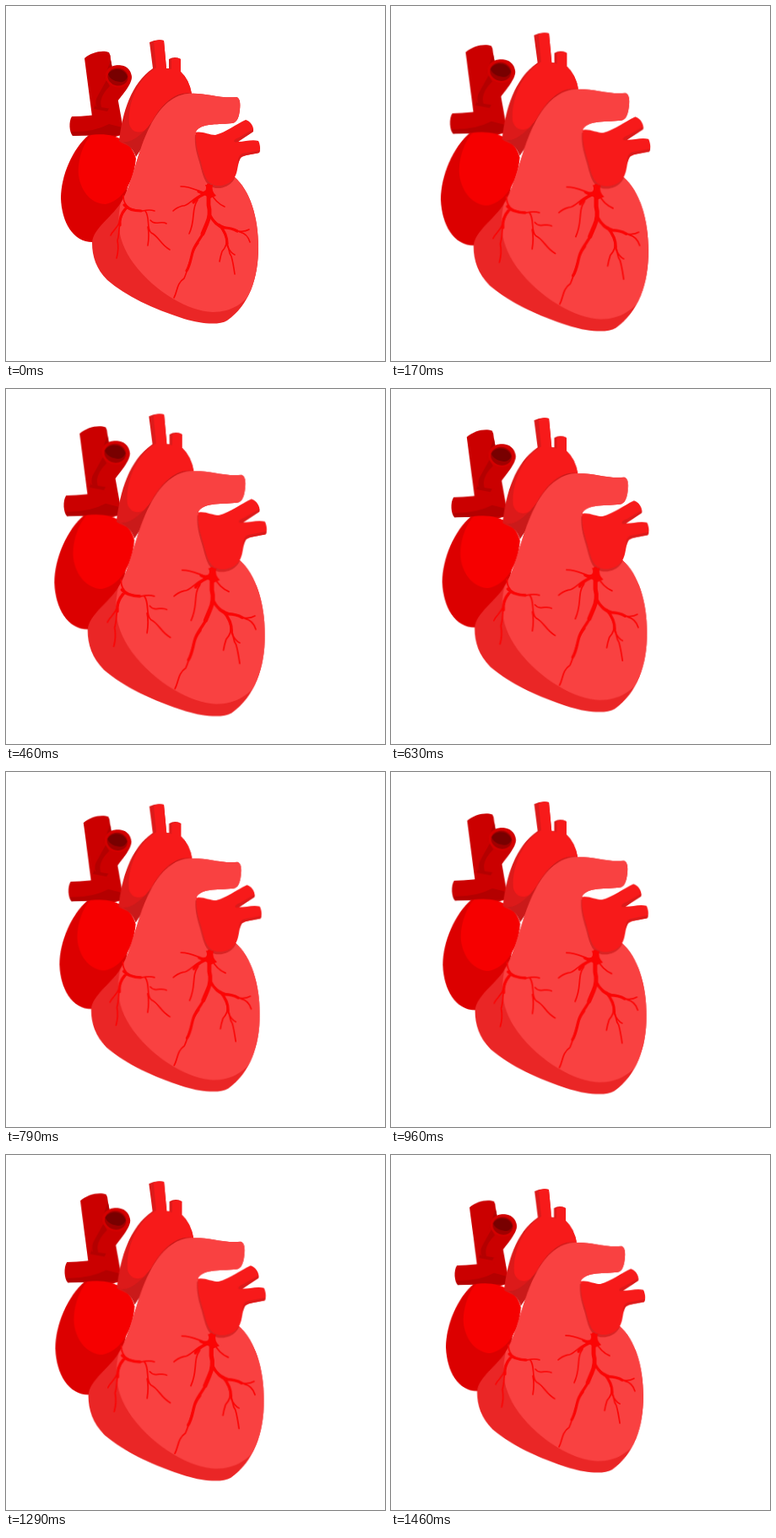
An HTML page without scripts that plays this animation: 449 px wide and 421 px high, repeating every 1500 ms.

```html
<!DOCTYPE html>
<html lang="en">
<head>
<meta charset="utf-8">
<title>Beating heart</title>
<style>
  html, body { margin: 0; width: 100%; height: 100%; overflow: hidden; background: #fff; }
  svg { display: block; width: 100vw; height: 100vh; }

  /* 36 poses per loop: two beats, each segment stepped one pose at a time */
  .heart { transform-origin: 182px 203px; animation: beat 1.5s -10ms infinite; }
  @keyframes beat {
    0%      { transform: scale(1);     animation-timing-function: steps(4); }
    11.111% { transform: scale(1.052); animation-timing-function: steps(3); }
    19.444% { transform: scale(1.096); animation-timing-function: steps(1); }
    22.222% { transform: scale(1.087); animation-timing-function: steps(7); }
    41.667% { transform: scale(1.037); animation-timing-function: steps(6); }
    58.333% { transform: scale(1.002); animation-timing-function: steps(2); }
    63.889% { transform: scale(1.031); animation-timing-function: steps(5); }
    77.778% { transform: scale(1.098); animation-timing-function: steps(7); }
    97.222%, 100% { transform: scale(1); }
  }

  .cava { fill: #cb0000; }
  .cava-shade { fill: #b40000; }
  .artery { fill: #f71a1a; }
  .artery-shade { fill: #dc1a1a; }
  .veins { fill: none; stroke: #fb0505; stroke-linecap: round; stroke-linejoin: round; }
</style>
</head>
<body>
<svg viewBox="0 0 449 421" preserveAspectRatio="none">
  <defs>
    <path id="body" d="M273 108C277 109 278 115 277 123C276 132 274 138 268 139C254 141 231 138 225 149L240 200L271 203C289 219 299 250 299 286C299 323 288 355 262 373C252 379 231 377 211 371C174 359 142 344 120 325C107 312 102 297 102 281C103 263 127 250 138 230C151 207 156 170 171 142C181 122 196 106 215 104C235 102 252 110 273 108Z"/>
    <path id="valve" d="M225 150C232 148 240 153 248 153C260 150 273 140 284 135C289 136 294 143 293 148C288 153 280 156 275 161C283 161 291 158 299 160C301 164 302 170 300 174C293 176 283 176 278 180C274 187 275 196 271 203C265 213 250 216 242 210C235 205 233 192 230 182C227 172 224 162 225 150Z"/>
    <clipPath id="in-body"><use href="#body"/></clipPath>
  </defs>

  <g class="heart">
    <g id="vena-cava">
      <path class="cava" d="M93 62C101 55 114 52 122 55Q124 58 124 63L140 152L106 162Z"/>
      <path class="cava-shade" d="M124 64L132 104L120 125L104 122Z"/>
      <path class="cava" d="M118 82C122 67 147 65 149 84C149 93 139 104 125 122L106 119Q104 111 108 104Z"/>
      <path class="cava-shade" d="M119 88L109 106Q105 112 107 119L114 122Q108 110 123 95Z"/>
      <ellipse cx="133" cy="83.500" rx="15.500" ry="13" fill="#d40000" transform="rotate(12 133 83.500)"/>
      <ellipse cx="132.500" cy="84" rx="12" ry="10.500" fill="#a00000" transform="rotate(12 132.500 84)"/>
      <path d="M121 81C125 73 140 72 144 84Q141 91 135 90C127 89 123 86 121 81Z" fill="#780000"/>
      <path class="cava" d="M78 131C92 131 108 129 122 127L125 151Q100 152 79 154C75 150 74 137 78 131Z"/>
      <path class="cava-shade" d="M77 149Q103 150 122 140L138 144L140 153L79 154Z"/>
    </g>

    <g id="left-atrium">
      <path fill="#dc0000" d="M98 153C79 169 65 201 65 228C66 257 80 281 104 280L140 233L152 180C150 165 127 149 98 153Z"/>
      <path fill="#f60000" d="M101 153C93 160 84 182 86 201C89 221 102 235 118 235C137 231 151 211 154 181C149 160 128 149 101 153Z"/>
    </g>

    <g id="aorta">
      <path class="artery-shade" d="M170 43Q178 39 187 41L190 74L193 74V63Q200 59 207 63V78Q217 87 220 104L187 125L155 176C148 164 137 164 134 160C138 126 148 92 174 74Z"/>
      <path class="artery" d="M175 42Q181 39 187 41L190 74L196 75V63Q203 60 207 63V78Q217 87 220 104C202 104 186 116 175 137C166 152 150 154 146 140C144 120 153 88 178 73Z"/>
      <path fill="#ca1a1a" d="M134 160C147 166 163 151 173 137C187 111 206 100 220 104L187 128L154 179Q148 163 134 160Z"/>
    </g>

    <use href="#body" fill="#ea2626"/>
    <g clip-path="url(#in-body)">
      <path fill="#f94141" d="M136 233C129 264 137 285 151 305C177 340 217 362 245 363C268 363 283 352 294 335L320 260L280 200V90H160Z"/>
      <use href="#valve" fill="#d92525" transform="translate(-1 3)"/>
    </g>

    <g id="pulmonary-vein">
      <use href="#valve" class="artery"/>
      <path class="artery-shade" d="M293 146V149L275 161C268 163 269 158 276 156Z"/>
      <path class="artery-shade" d="M301 171L300 174L280 178Q277 180 275 187Q274 178 280 175Z"/>
    </g>

    <g class="veins">
      <g stroke-width="1.600">
        <path d="M240 219C231 225 225 214 207 214"/>
        <path d="M234 223C221 227 216 238 209 237Q202 239 198 243"/>
        <path d="M227 230C219 241 225 253 217 270"/>
        <path d="M243 222Q248 233 259 238"/>
        <path d="M242 248C251 265 268 262 277 268Q286 270 289 280M276 267Q283 268 288 265"/>
        <path d="M253 260C260 271 266 280 256 291Q254 297 253 303M262 282C265 288 263 292 267 297Q269 304 271 318"/>
        <path d="M262 284Q266 293 271 295"/>
        <path d="M228 281C218 293 217 310 211 323C202 329 203 339 199 346"/>
        <path d="M139 225C139 242 154 242 162 243Q170 241 176 243"/>
        <path d="M144 239C131 252 136 266 132 278Q134 288 131 299M136 253C131 266 127 265 124 272"/>
        <path d="M165 243C171 251 166 264 172 269C181 273 183 283 194 289M168 262Q170 271 168 284M171 254C177 261 184 254 190 258"/>
      </g>
      <g stroke-width="3.200">
        <path d="M239 219Q234 224 228 220M235 223Q226 227 222 233M241 247Q248 261 258 263Q267 263 274 267"/>
        <path d="M253 260Q262 270 262 282M237 260C235 272 227 277 222 289C219 297 219 306 214 314"/>
        <path d="M140 236Q146 243 160 243M141 241Q134 249 135 260"/>
      </g>
      <path stroke-width="4.800" d="M240 213V236Q243 247 238 258L233 270"/>
      <path stroke="none" fill="#fb0505" d="M231 222Q240 219 236 212H245Q243 220 249 225L242 228Z"/>
    </g>
  </g>
</svg>
</body>
</html>
```
